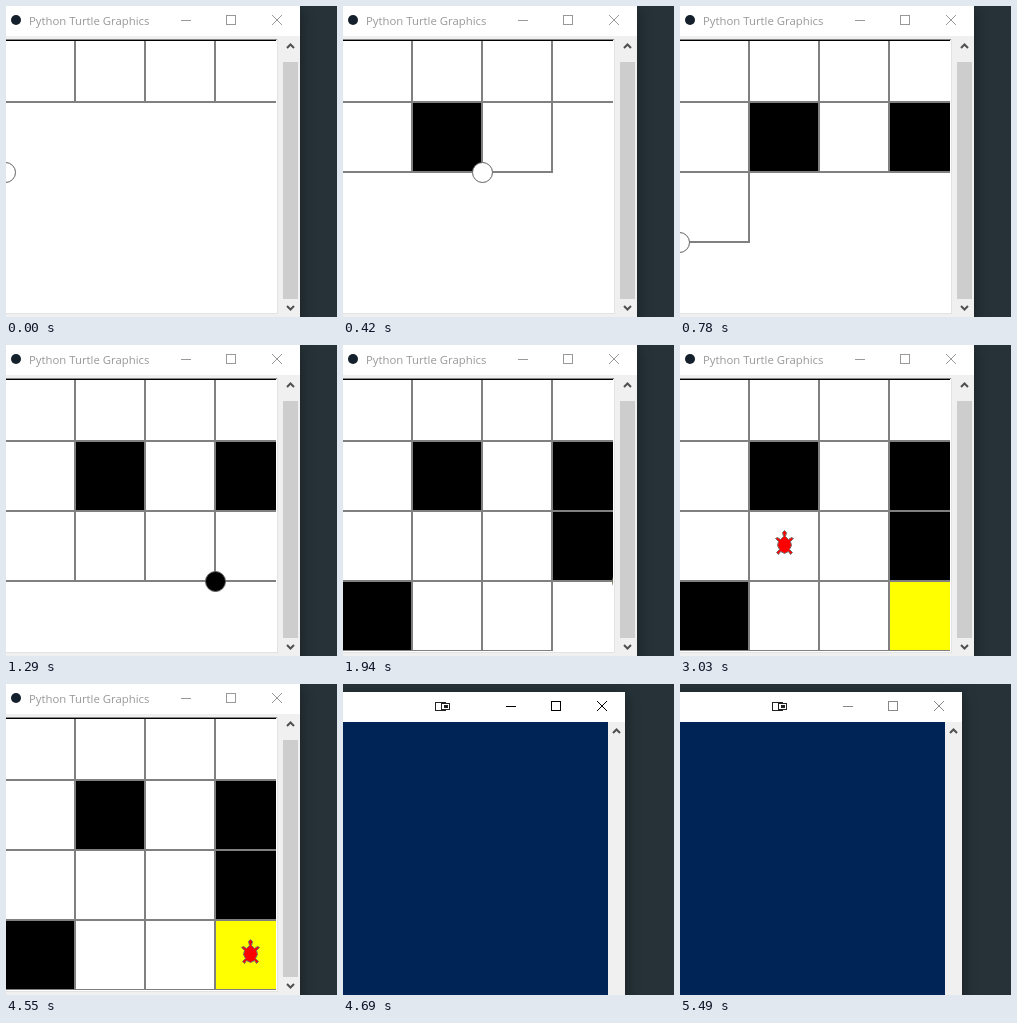
An HTML page with a canvas for the animation above (5560 ms loop, 331 px wide and 311 px high).

```html
<!DOCTYPE html>
<html lang="en">
<head>
<meta charset="utf-8">
<title>Grid walk</title>
<style>
html, body { margin: 0; width: 331px; height: 311px; overflow: hidden; background: #263238; }
canvas { display: block; }
</style>
</head>
<body>
<canvas id="stage" width="331" height="311"></canvas>
<script>
const ctx = document.getElementById('stage').getContext('2d');
const LOOP = 5560, TICK = 72.3;
const WALK_START = 2005, WALK_STEP = 504, CLOSE = 4610, ICON = 4680, BLUR = 5190;
const UNIT = 70, LEFT = -1, TOP = 26;
const MAP = ['SFFF', 'FHFH', 'FFFH', 'HFFG'];
const FILL = { S: '#fff', F: '#fff', H: '#000', G: '#ff0' };
// [time, cells drawn after the first row]
const PROGRESS = [[0, 0.1], [420, 2.9], [1290, 7.9], [1940, 11.5], [WALK_START, 12]];
// [row, column]
const ROUTE = [[1, 0], [2, 0], [2, 1], [3, 1], [3, 2], [3, 3]];
const HALF_TURTLE = [[0, 16], [-2, 14], [-1, 10], [-4, 7], [-7, 9], [-9, 8], [-6, 5],
  [-7, 1], [-5, -3], [-8, -6], [-6, -8], [-4, -5], [0, -7]];
const TURTLE = HALF_TURTLE.concat(HALF_TURTLE.slice(1, -1).reverse().map(([x, y]) => [-x, y]));

function rect(x, y, w, h, color) {
  ctx.fillStyle = color;
  ctx.fillRect(x, y, w, h);
}

function trace(points, color, width) {
  ctx.beginPath();
  points.forEach(([x, y]) => ctx.lineTo(x, y));
  ctx.strokeStyle = color;
  ctx.lineWidth = width;
  ctx.stroke();
}

function disc(x, y, r, fill, line) {
  ctx.beginPath();
  ctx.arc(x, y, r, 0, Math.PI * 2);
  ctx.fillStyle = fill;
  ctx.fill();
  if (!line) return;
  ctx.strokeStyle = line;
  ctx.lineWidth = 1;
  ctx.stroke();
}

function chevron(x, y, dir) {
  trace([[x - 3.5, y + 2 * dir], [x, y - 1.5 * dir], [x + 3.5, y + 2 * dir]], '#505050', 2);
}

// Minimise, maximise and close marks; x is the left end of the first
function controls(x, y, color) {
  rect(x, y, 10, 1, color);
  ctx.strokeStyle = color;
  ctx.lineWidth = 1;
  ctx.strokeRect(x + 45.5, y - 4.5, 9, 9);
  trace([[x + 91, y - 5], [x + 101, y + 5]], color, 1);
  trace([[x + 101, y - 5], [x + 91, y + 5]], color, 1);
}

function desktop(right, top) {
  rect(0, 0, 331, 311, '#263238');
  ctx.save();
  ctx.shadowColor = 'rgba(0,0,0,0.4)';
  ctx.shadowBlur = 14;
  ctx.shadowOffsetY = 4;
  rect(-30, top, right + 30, 360, '#fff');
  ctx.restore();
}

function progress(t) {
  for (let i = 1; i < PROGRESS.length; i++) {
    const [t0, a] = PROGRESS[i - 1], [t1, b] = PROGRESS[i];
    if (t < t1) return a + (b - a) * (t - t0) / (t1 - t0);
  }
  return 12;
}

// Draws the sides walked so far and returns the pen position
function cell(index, part) {
  const row = Math.floor(index / 4), col = index % 4;
  const x = LEFT + col * UNIT, y = TOP + row * UNIT;
  const path = [[x, y + UNIT], [x, y], [x + UNIT, y], [x + UNIT, y + UNIT], [x, y + UNIT]];
  const fill = FILL[MAP[row][col]];
  const sides = Math.min(4, Math.floor(part * 5));
  if (part >= 1) rect(x, y, UNIT, UNIT, fill);
  ctx.lineCap = 'square';
  if (sides) trace(path.slice(0, sides + 1), '#808080', 2);
  ctx.lineCap = 'butt';
  return { pos: path[sides], fill };
}

function player([row, col]) {
  const x = LEFT + (col + 0.5) * UNIT, y = TOP + (row + 0.5) * UNIT;
  ctx.beginPath();
  TURTLE.forEach(([dx, dy]) => ctx.lineTo(x + dx + 0.5, y - dy + 0.5));
  ctx.closePath();
  ctx.fillStyle = '#f00';
  ctx.fill();
  ctx.strokeStyle = '#707070';
  ctx.lineWidth = 1;
  ctx.stroke();
}

function board(t) {
  ctx.save();
  ctx.beginPath();
  ctx.rect(0, 35, 270, 271);
  ctx.clip();
  const done = 4 + progress(t);
  let pen;
  for (let i = 0; i < Math.min(16, done); i++) pen = cell(i, Math.min(1, done - i));
  if (t < WALK_START) disc(pen.pos[0] + 0.5, pen.pos[1] + 0.5, 10, pen.fill, '#606060');
  else player(ROUTE[Math.min(5, Math.floor((t - WALK_START) / WALK_STEP))]);
  ctx.restore();
}

function turtleWindow(t) {
  desktop(294, -1);
  disc(10, 14, 5, '#14202c');
  ctx.fillStyle = '#999';
  ctx.font = '11.35px "Open Sans", "Noto Sans", sans-serif';
  ctx.fillText('Python Turtle Graphics', 23, 19);
  controls(175, 14, '#999');
  rect(0, 30, 294, 281, '#f0f0f0');
  rect(0, 33, 271, 1, '#888');
  rect(0, 34, 270, 1, '#000');
  rect(0, 35, 271, 272, '#fff');
  rect(271, 33, 1, 275, '#e3e3e3');
  rect(0, 307, 272, 1, '#e3e3e3');
  rect(277, 56, 15, 237, '#cdcdcd');
  chevron(284.5, 40, 1);
  chevron(284.5, 302, -1);
  board(t);
}

function shellWindow(t) {
  desktop(282, 8);
  rect(0, 38, 265, 273, '#012456');
  rect(265, 38, 17, 273, '#f0f0f0');
  chevron(273.5, 47, 1);
  controls(163, 22, t < BLUR ? '#000' : '#888');
  if (t < ICON) return;
  ctx.strokeStyle = '#222';
  ctx.lineWidth = 1;
  ctx.strokeRect(92.5, 18.5, 10, 8);
  rect(98, 19, 9, 7, '#222');
  rect(99, 20, 7, 5, '#fff');
  rect(101, 21, 4, 3, '#222');
}

function draw(now) {
  const n = Math.floor((now % LOOP + 16) / TICK);
  const t = Math.max(0, n * TICK - 13);
  if (t < CLOSE) turtleWindow(t);
  else shellWindow(t);
}

const start = performance.now();
function loop() {
  draw(performance.now() - start);
  requestAnimationFrame(loop);
}
loop();
</script>
</body>
</html>
```
